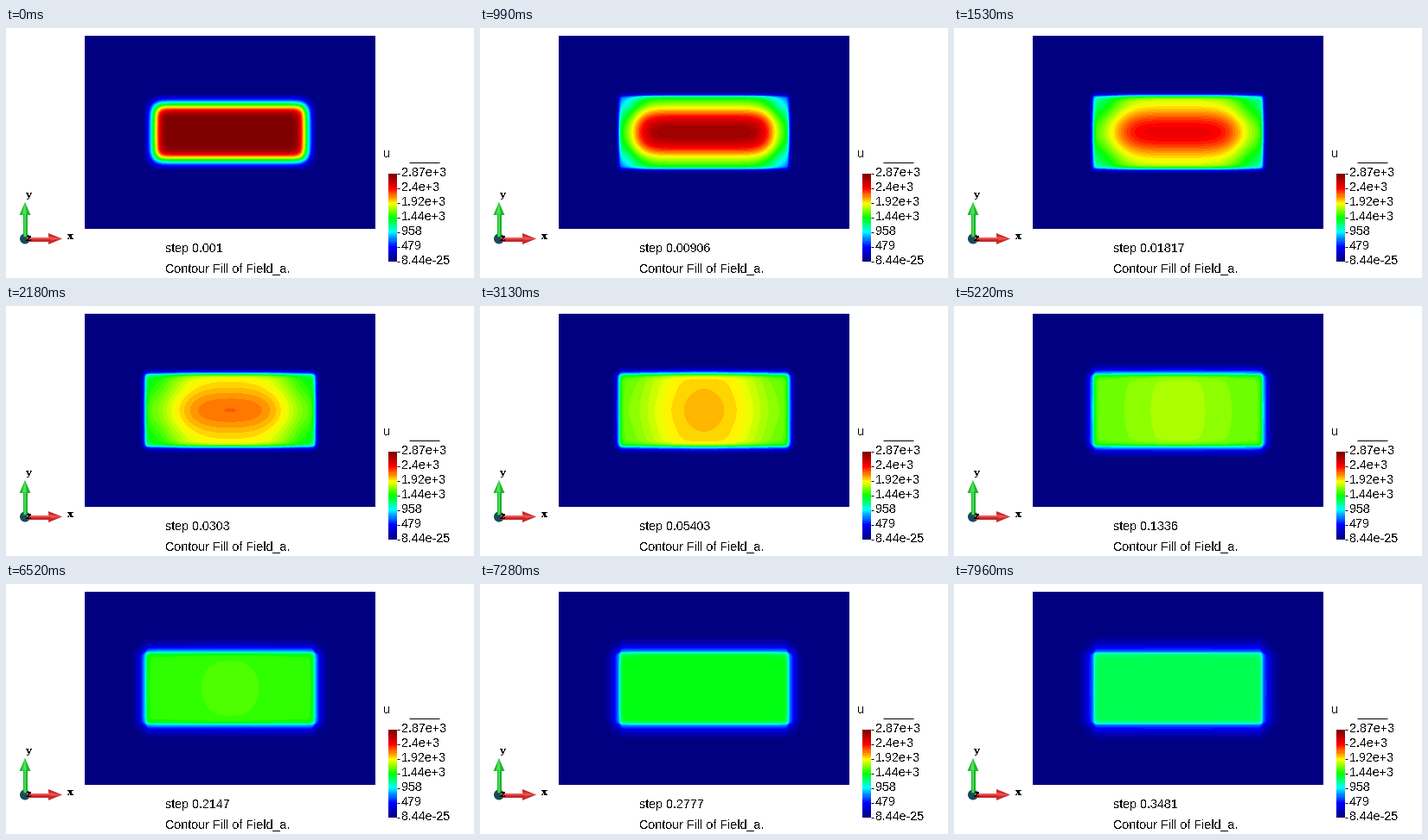
Recreate the animation shown at these times as a matplotlib script. Size 541 by 290 pixels, loop 8000 ms.

```python
import math

import numpy as np
import matplotlib.pyplot as plt
from matplotlib.animation import FuncAnimation

W, H, DPI = 541, 290, 100
TICK, LOOP = 20, 8000
BANDS = 50

# contour field geometry, in pixels
X0, X1, Y0, Y1 = 91, 427, 9, 233
CX, CY = 259, 121
HALF_X, HALF_Y = 98, 42        # conducting block
MARGIN = 9.8                   # initially cold rim of the block
D_IN, D_OUT = 13000, 155       # diffusivities, px^2 per unit time
T_SOFT = .0007                 # softens the initial front
RIM = .4                       # relative drop at the block's edge


def band_colors():
    pos = np.arange(BANDS) / (BANDS - 1) * 6
    stops = np.arange(7)
    r = np.interp(pos, stops, [0, 0, 0, 0, 1, 1, .5])
    g = np.interp(pos, stops, [0, 0, 1, 1, 1, 0, 0])
    b = np.interp(pos, stops, [.5, 1, 1, 0, 0, 0, 0])
    return np.round(np.stack([r, g, b], axis=1) * 255).astype(np.uint8)


COLORS = band_colors()
erfc = np.vectorize(math.erfc)


def sim_time(n):
    """Constant steps first, then each step 2% longer."""
    if n < 5:
        return .001 * (n + 1)
    return .006 + .05 * (1.02 ** (n - 5) - 1)


def profile(d, half, t):
    """Diffusion along one axis, d measured from the centre."""
    inside = np.minimum(d, half)
    ratio = 1 - MARGIN / half
    u = np.full(d.shape, ratio)
    for k in range(1, 41):
        q = k * math.pi
        decay = math.exp(-D_IN * (t + T_SOFT) * (q / half) ** 2)
        u += 2 / q * math.sin(q * ratio) * decay * np.cos(q * inside / half)
    width = math.sqrt(4 * D_OUT * t + 8)
    dip = 1 - RIM * np.exp(-(half - inside) / 1.8)
    return u * dip * erfc(np.maximum(d - half, 0) / width)


def field(n):
    t = sim_time(n)
    dx = np.abs(np.arange(X0, X1) + .5 - CX)
    dy = np.abs(np.arange(Y0, Y1) + .5 - CY)
    u = profile(dx, HALF_X, t)
    v = profile(dy, HALF_Y, t) * (1 - 5e-6 * np.minimum(dy, HALF_Y) ** 2)
    loss = np.interp(t, [.01, .0303, .0854, .1336, .2147, .3481],
                     [0, .063, .078, .159, .251, .425])
    level = np.outer(v, u) * math.exp(-loss)
    return COLORS[np.clip((level * BANDS).astype(int), 0, BANDS - 1)]


def change_times():
    starts = [530, 1350, 2180, 2990, 3830, 4670, 5490, 6310, 7140]
    ends = [1270, 2090, 2920, 3760, 4600, 5420, 6260, 7070, 7880]
    times = []
    for a, b in zip(starts, ends):
        times += [a] + [b - 70 * k for k in range(10, -1, -1)]
    return np.array(times + [7960])


TIMES = change_times()
FIELDS = [field(n) for n in range(len(TIMES) + 1)]

fig = plt.figure(figsize=(W / 100, H / 100), dpi=DPI, facecolor="white")
ax = fig.add_axes([0, 0, 1, 1])


def label(x, y, s, size=14.2, font="Liberation Sans", **kw):
    return ax.text(x, y, s, fontsize=size * 72 / DPI, family=font,
                   color="black", antialiased=False, **kw)


def line(xs, ys, color="black", px=1):
    ax.plot(xs, ys, color=color, lw=px * 72 / DPI, solid_capstyle="butt")


def shape(points, color):
    ax.fill(*zip(*points), color=color, lw=0)


def legend():
    ax.imshow(COLORS[::-1, None], extent=(442, 452, 271, 169),
              interpolation="nearest", aspect="auto")
    names = ["2.87e+3", "2.4e+3", "1.92e+3", "1.44e+3", "958", "479", "8.44e-25"]
    for i, s in enumerate(names):
        y = 168 + 17 * i
        line([452, 455], [y + .5, y + .5])
        label(457, y + 4, s)
    label(436, 150, "u")
    line([466, 501], [155.5, 155.5])


def triad():
    # green y arrow
    line([22, 22], [242, 215], "#1fae2c", 5)
    line([21.5, 21.5], [242, 215], "#45e052", 2)
    shape([(22, 202), (15.5, 217), (28.5, 217)], "#1fb52c")
    shape([(22, 202), (18.5, 217), (24, 217)], "#4be458")
    # red x arrow
    line([24, 51], [244.5, 244.5], "#c22a2a", 5)
    line([24, 51], [244, 244], "#ee5656", 2)
    shape([(65, 244.5), (49, 238), (49, 251)], "#c62a2a")
    shape([(65, 244.5), (49, 241.5), (49, 246.5)], "#ee5050")
    # z axis seen end-on
    ax.add_patch(plt.Circle((22, 244.5), 6, color="#164a5c", lw=0))
    for x, y, s in [(26, 197, "y"), (74, 245, "x"), (25.5, 247, "z")]:
        label(x, y, s, 11.5, "DejaVu Serif", weight="bold", ha="center")


view = ax.imshow(FIELDS[0], extent=(X0, X1, Y1, Y0), interpolation="nearest")
legend()
triad()
step = label(184, 260, "")
label(184, 283, "Contour Fill of Field_a.")
ax.set_aspect("auto")
ax.set_xlim(0, W)
ax.set_ylim(H, 0)
ax.axis("off")


def update(i):
    n = int(np.searchsorted(TIMES, i * TICK + TICK / 2, side="right"))
    view.set_data(FIELDS[n])
    step.set_text(f"step {sim_time(n):.4g}")
    return view, step


anim = FuncAnimation(fig, update, frames=LOOP // TICK, interval=TICK,
                     repeat=True, repeat_delay=0)
plt.show()
```
